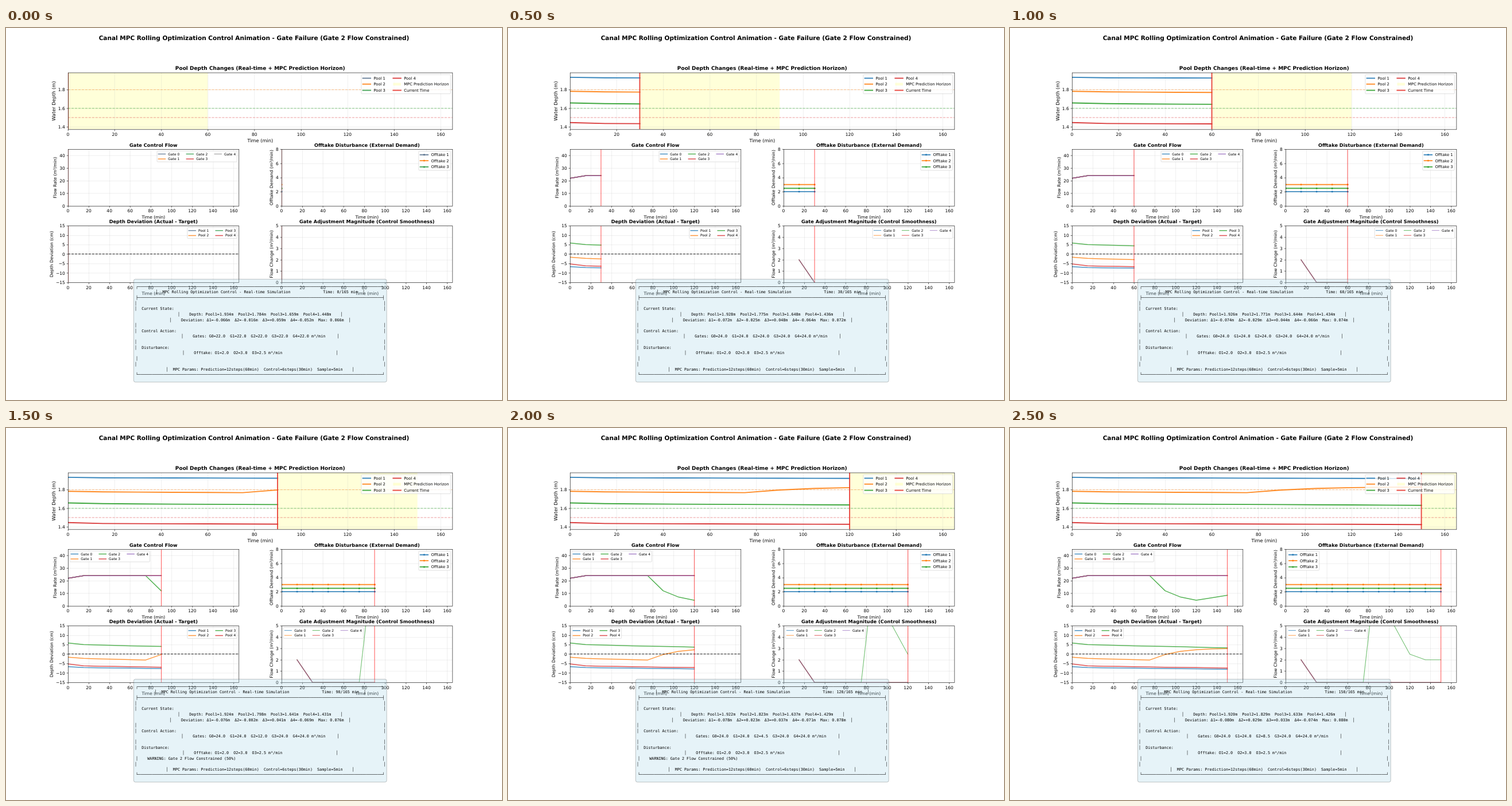
An HTML page with a canvas for the animation above (3000 ms loop, 864 px wide and 648 px high).

```html
<!DOCTYPE html>
<html lang="en">
<head>
<meta charset="utf-8">
<title>Canal MPC rolling optimization</title>
<style>
html, body { margin: 0; width: 100%; height: 100%; overflow: hidden; background: #fff; }
canvas { display: block; width: 864px; height: 648px; }
</style>
</head>
<body>
<canvas id="stage" width="864" height="648"></canvas>
<script>
const ctx = document.getElementById('stage').getContext('2d');
const SANS = '"DejaVu Sans", sans-serif';
const MONO = '"DejaVu Sans Mono", monospace';
const STEP_MS = 500, STEPS = 6, T_MAX = 165, SAMPLE = 15;
const COLORS = ['#1f77b4', '#ff7f0e', '#2ca02c', '#d62728', '#9467bd'];
const MUTED = ['#56708c', '#ff7f0e', '#2f9a46', '#d62728', '#a0a0a0'];

// Simulation history, one value per 15 minutes
const target = [2.0, 1.8, 1.6, 1.5];
const deviation = [
  [-66, -71, -72, -73, -74, -75, -76, -77, -78, -79, -80],
  [-16, -22, -25, -27, -29, -31, -2, 15, 23, 27.5, 29],
  [59, 51, 48, 46, 44, 42.5, 41, 39, 37, 35, 33],
  [-52, -62, -64, -65, -66, -67.5, -69, -70, -71, -72.5, -74]
].map(row => row.map(v => v / 1000));
const depth = deviation.map((row, i) => row.map(v => target[i] + v));
const steady = [22, ...Array(10).fill(24)];
const gates = [0, 1, 2, 3, 4].map(i =>
  i === 2 ? [...steady.slice(0, 6), 12, 7, 4.5, 6.5, 8.5] : steady);
const moves = gates.map(row => row.map((v, i) => i ? Math.abs(v - row[i - 1]) : null));
const offtake = [2, 3, 2.5].map(v => Array(11).fill(v));

const COL = [108, 480], ROW = [77.76, 211.15, 344.53], HEIGHT = 98.8, WIDTH = 297.6;
const makeAxes = (col, row, o) => ({
  x: COL[col], y: ROW[row], w: WIDTH, h: HEIGHT, labelSize: 7.5, titleSize: 8.25, ...o,
  px(t) { return this.x + t / T_MAX * this.w; },
  py(v) { return this.y + (this.max - v) / (this.max - this.min) * this.h; }
});
const range = (from, to, by) =>
  Array.from({ length: Math.round((to - from) / by) + 1 }, (_, i) => from + i * by);

const poolAxes = makeAxes(0, 0, {
  w: 669.6, min: 1.375, max: 1.984, ticks: [1.4, 1.6, 1.8], digits: 1, labelSize: 8.25,
  titleSize: 9, title: 'Pool Depth Changes (Real-time + MPC Prediction Horizon)', label: 'Water Depth (m)'
});
const flowAxes = makeAxes(0, 1, {
  min: 0, max: 45, ticks: range(0, 40, 10), title: 'Gate Control Flow', label: 'Flow Rate (m³/min)'
});
const offtakeAxes = makeAxes(1, 1, {
  min: 0, max: 8, ticks: range(0, 8, 2),
  title: 'Offtake Disturbance (External Demand)', label: 'Offtake Demand (m³/min)'
});
const devAxes = makeAxes(0, 2, {
  min: -15, max: 15, ticks: range(-15, 15, 5),
  title: 'Depth Deviation (Actual - Target)', label: 'Depth Deviation (cm)'
});
const moveAxes = makeAxes(1, 2, {
  min: 0, max: 5, ticks: range(0, 5, 1),
  title: 'Gate Adjustment Magnitude (Control Smoothness)', label: 'Flow Change (m³/min)'
});

// Text is laid out at 100px and scaled down, so advances stay fractional.
function setFont(family, bold) {
  ctx.font = `${bold ? 'bold ' : ''}100px ${family}`;
}
function text(str, x, y, size, { align = 'left', bold = false, family = SANS, turn = 0 } = {}) {
  ctx.save();
  ctx.translate(x, y);
  ctx.rotate(turn);
  ctx.scale(size / 100, size / 100);
  setFont(family, bold);
  ctx.textAlign = align;
  ctx.fillStyle = '#000';
  ctx.fillText(str, 0, 0);
  ctx.restore();
}
function textWidth(str, size) {
  setFont(SANS);
  return ctx.measureText(str).width * size / 100;
}

function stroke(points, color, width, { alpha = 1, dash = [], cap = 'square' } = {}) {
  ctx.save();
  ctx.globalAlpha *= alpha;
  ctx.strokeStyle = color;
  ctx.lineWidth = width;
  ctx.lineCap = dash.length ? 'butt' : cap;
  ctx.lineJoin = 'round';
  ctx.setLineDash(dash.map(d => d * width));
  ctx.beginPath();
  points.forEach(([x, y], i) => i ? ctx.lineTo(x, y) : ctx.moveTo(x, y));
  ctx.stroke();
  ctx.restore();
}
function dot(x, y, color) {
  ctx.fillStyle = color;
  ctx.beginPath();
  ctx.arc(x, y, 1.5, 0, 7);
  ctx.fill();
}
function roundBox(x, y, w, h, r, fill, edge, alpha) {
  ctx.save();
  ctx.globalAlpha = alpha;
  ctx.beginPath();
  ctx.roundRect(x, y, w, h, r);
  ctx.fillStyle = fill;
  ctx.fill();
  ctx.strokeStyle = edge;
  ctx.lineWidth = 0.75;
  ctx.stroke();
  ctx.restore();
}

// Straight lines sit on a 1600 x 1200 plotting grid shown at 0.54 scale.
const UNIT = 0.54, THIN = 0.6;
function snap(v, width = THIN) {
  const odd = Math.round(width / UNIT) % 2;
  return (Math.floor(v / UNIT + 0.5) + odd / 2) * UNIT;
}
function hLine(ax, v, color, width, o) {
  const y = snap(ax.py(v), width);
  stroke([[ax.x, y], [ax.x + ax.w, y]], color, width, { cap: 'butt', ...o });
}
function vLine(ax, t, color, width, o) {
  const x = snap(ax.px(t), width);
  stroke([[x, ax.y], [x, ax.y + ax.h]], color, width, { cap: 'butt', ...o });
}

function series(ax, rows, n, { width, alpha, scale = 1, marker = false }) {
  rows.forEach((row, i) => {
    const flat = row.every(v => v === row[0]);
    const place = v => flat ? snap(ax.py(v), width) : ax.py(v);
    const pts = row.slice(0, n)
      .map((v, k) => v === null ? null : [ax.px(k * SAMPLE), place(v * scale)])
      .filter(Boolean);
    if (pts.length > 1) stroke(pts, COLORS[i], width, { alpha });
    if (marker) pts.forEach(([x, y]) => dot(x, y, COLORS[i]));
  });
}

function drawAxes(ax, content) {
  const bottom = ax.y + ax.h, xTicks = range(0, 160, 20);
  const grid = { alpha: 0.35 };
  ctx.save();
  ctx.beginPath();
  ctx.rect(ax.x, ax.y, ax.w, ax.h);
  ctx.clip();
  if (ax.shade) {
    ctx.fillStyle = 'rgba(255,255,0,0.15)';
    ctx.fillRect(ax.px(ax.shade[0]), ax.y, ax.px(ax.shade[1]) - ax.px(ax.shade[0]), ax.h);
  }
  xTicks.forEach(t => vLine(ax, t, '#b0b0b0', THIN, grid));
  ax.ticks.forEach(v => hLine(ax, v, '#b0b0b0', THIN, grid));
  content();
  ctx.restore();

  const left = snap(ax.x), top = snap(ax.y), base = snap(bottom);
  ctx.strokeStyle = '#000';
  ctx.lineWidth = THIN;
  ctx.strokeRect(left, top, snap(ax.x + ax.w) - left, base - top);
  xTicks.forEach(t => {
    const x = snap(ax.px(t));
    stroke([[x, base], [x, base + 2.6]], '#000', THIN, { cap: 'butt' });
    text(String(t), ax.px(t), bottom + 11.2, 7.5, { align: 'center' });
  });
  let widest = 0;
  ax.ticks.forEach(v => {
    const y = snap(ax.py(v)), label = v.toFixed(ax.digits || 0).replace('-', '−');
    stroke([[left - 2.6, y], [left, y]], '#000', THIN, { cap: 'butt' });
    text(label, ax.x - 5.2, ax.py(v) + 2.8, 7.5, { align: 'right' });
    widest = Math.max(widest, textWidth(label, 7.5));
  });
  const center = ax.x + ax.w / 2;
  text(ax.title, center, ax.y - 4.5, ax.titleSize, { align: 'center', bold: true });
  text('Time (min)', center, bottom + 22.1, ax.labelSize, { align: 'center' });
  text(ax.label, ax.x - 8.2 - widest - 0.236 * ax.labelSize, ax.y + ax.h / 2, ax.labelSize,
    { align: 'center', turn: -Math.PI / 2 });
}

function legend(ax, items, { size, cols, onLeft = false, width = 1.5, alpha = 0.8 }) {
  const rowH = size > 6.5 ? 7.1 : 5.6, gap = size / 2, pad = 0.4 * size;
  const perCol = Math.ceil(items.length / cols);
  const colWidths = Array.from({ length: cols }, (_, c) => 2.8 * size +
    Math.max(...items.slice(c * perCol, (c + 1) * perCol).map(it => textWidth(it.name, size))));
  const w = 2 * pad + colWidths.reduce((a, b) => a + b) + (cols - 1) * 2 * size;
  const h = 2 * pad + perCol * rowH + (perCol - 1) * gap;
  const x = onLeft ? ax.x + gap : ax.x + ax.w - gap - w, y = ax.y + gap;
  roundBox(x, y, w, h, 0.2 * size, '#fff', '#ccc', 0.8);
  let cx = x + pad;
  for (let c = 0; c < cols; c++) {
    items.slice(c * perCol, (c + 1) * perCol).forEach((it, r) => {
      const cy = y + pad + rowH / 2 + r * (rowH + gap);
      if (it.patch) {
        ctx.fillStyle = it.color;
        ctx.fillRect(cx, cy - 0.35 * size, 2 * size, 0.7 * size);
      } else {
        const ly = snap(cy, width);
        stroke([[cx, ly], [cx + 2 * size, ly]], it.color, width, { alpha });
        if (it.marker) dot(cx + size, ly, it.color);
      }
      text(it.name, cx + 2.8 * size, cy + 0.36 * size, size);
    });
    cx += colWidths[c] + 2 * size;
  }
}

function drawPanel(k, time) {
  const now = rows => rows.map(row => row[k]);
  const signed = v => (v < 0 ? '-' : '+') + Math.abs(v).toFixed(3);
  const list = (rows, f) => now(rows).map(f).join('  ');
  const boxed = (str, width) => '│' + str.padEnd(width - 2) + '│';
  const maxDev = Math.max(...now(deviation).map(Math.abs)).toFixed(3);
  const bar = '─'.repeat(105), blank = boxed('', 108);
  const constrained = time >= 90 && time <= 120;
  const lines = [
    `┌${bar}┐`,
    `│  MPC Rolling Optimization Control - Real-time Simulation${' '.repeat(14)}Time: ${time}/${T_MAX} min  │`,
    `├${bar}┤`,
    blank,
    boxed('  Current State:', 108),
    `│    Depth: ${list(depth, (v, i) => `Pool${i + 1}=${v.toFixed(3)}m`)}    │`,
    `│    Deviation: ${list(deviation, (v, i) => `Δ${i + 1}=${signed(v)}m`)}  Max: ${maxDev}m  │`,
    blank,
    boxed('  Control Action:', 108),
    `│    Gates: ${list(gates, (v, i) => `G${i}=${v.toFixed(1)}`)} m³/min     │`,
    blank,
    boxed('  Disturbance:', 108),
    boxed(`    Offtake: ${list(offtake, (v, i) => `O${i + 1}=${v.toFixed(1)}`)} m³/min`, 67),
    boxed(constrained ? '    WARNING: Gate 2 Flow Constrained (50%)' : '', 107),
    blank,
    '│  MPC Params: Prediction=12steps(60min)  Control=6steps(30min)  Sample=5min    │',
    `└${bar}┘`
  ];
  roundBox(222.4, 437.6, 440.8, 179.2, 3, '#add8e6', '#000', 0.3);
  lines.forEach((line, i) => {
    const y = 452.6 + 9.65 * i - (i === 16 ? 1.3 : 0);
    text(line, 442.8, y, 6.73, { align: 'center', family: MONO });
  });
}

function draw(step) {
  const time = step * 30, k = step * 2, n = k + 1;
  const palette = step ? COLORS : MUTED;
  const names = (word, count, first, extra) => Array.from({ length: count }, (_, i) =>
    ({ name: `${word} ${i + first}`, color: palette[i], ...extra }));
  const marker = ax => vLine(ax, time, '#f00', 1.125, { alpha: 0.6 });
  const dash = [3.7, 1.6];

  ctx.fillStyle = '#fff';
  ctx.fillRect(0, 0, 864, 648);
  ctx.textRendering = 'geometricPrecision';
  text('Canal MPC Rolling Optimization Control Animation - Gate Failure (Gate 2 Flow Constrained)',
    432, 21.1, 10.5, { align: 'center', bold: true });

  poolAxes.shade = [time, Math.min(time + 60, T_MAX)];
  drawAxes(poolAxes, () => {
    target.forEach((v, i) => hLine(poolAxes, v, COLORS[i], 1.125, { alpha: 0.45, dash }));
    series(poolAxes, depth, n, { width: 1.9, alpha: 0.9 });
    vLine(poolAxes, time, '#e8302a', 1.9, { alpha: 0.88 });
  });
  legend(poolAxes, [
    ...names('Pool', 4, 1),
    { name: 'MPC Prediction Horizon', color: 'rgba(255,255,0,0.15)', patch: true },
    { name: 'Current Time', color: '#e8302a' }
  ], { size: 6.75, cols: 2, width: 1.9, alpha: 0.88 });

  drawAxes(flowAxes, () => {
    series(flowAxes, gates, n, { width: 1.5, alpha: 0.8 });
    marker(flowAxes);
  });
  legend(flowAxes, names('Gate', 5, 0), { size: 6, cols: 3, onLeft: step >= 3 });

  drawAxes(offtakeAxes, () => {
    series(offtakeAxes, offtake, n, { width: 1.9, alpha: 0.85, marker: true });
    marker(offtakeAxes);
  });
  legend(offtakeAxes, names('Offtake', 3, 1, { marker: true }),
    { size: 6.75, cols: 1, onLeft: step >= 5, width: 1.9, alpha: 0.85 });

  drawAxes(devAxes, () => {
    series(devAxes, deviation, n, { width: 1.5, alpha: 0.8, scale: 100 });
    hLine(devAxes, 0, '#000', 1.125, { alpha: 0.7, dash });
    marker(devAxes);
  });
  legend(devAxes, names('Pool', 4, 1), { size: 6, cols: 2, onLeft: step >= 4 });

  drawAxes(moveAxes, () => {
    series(moveAxes, moves, n, { width: 1.125, alpha: 0.65 });
    marker(moveAxes);
  });
  if (step) {
    legend(moveAxes, names('Gate', 5, 0),
      { size: 6, cols: 3, onLeft: step >= 3, width: 1.125, alpha: 0.65 });
  }

  drawPanel(k, time);
}

const start = performance.now();
let shown = -1;
function tick() {
  const step = Math.floor((performance.now() - start) / STEP_MS) % STEPS;
  if (step !== shown) draw(shown = step);
  requestAnimationFrame(tick);
}
tick();
</script>
</body>
</html>
```
